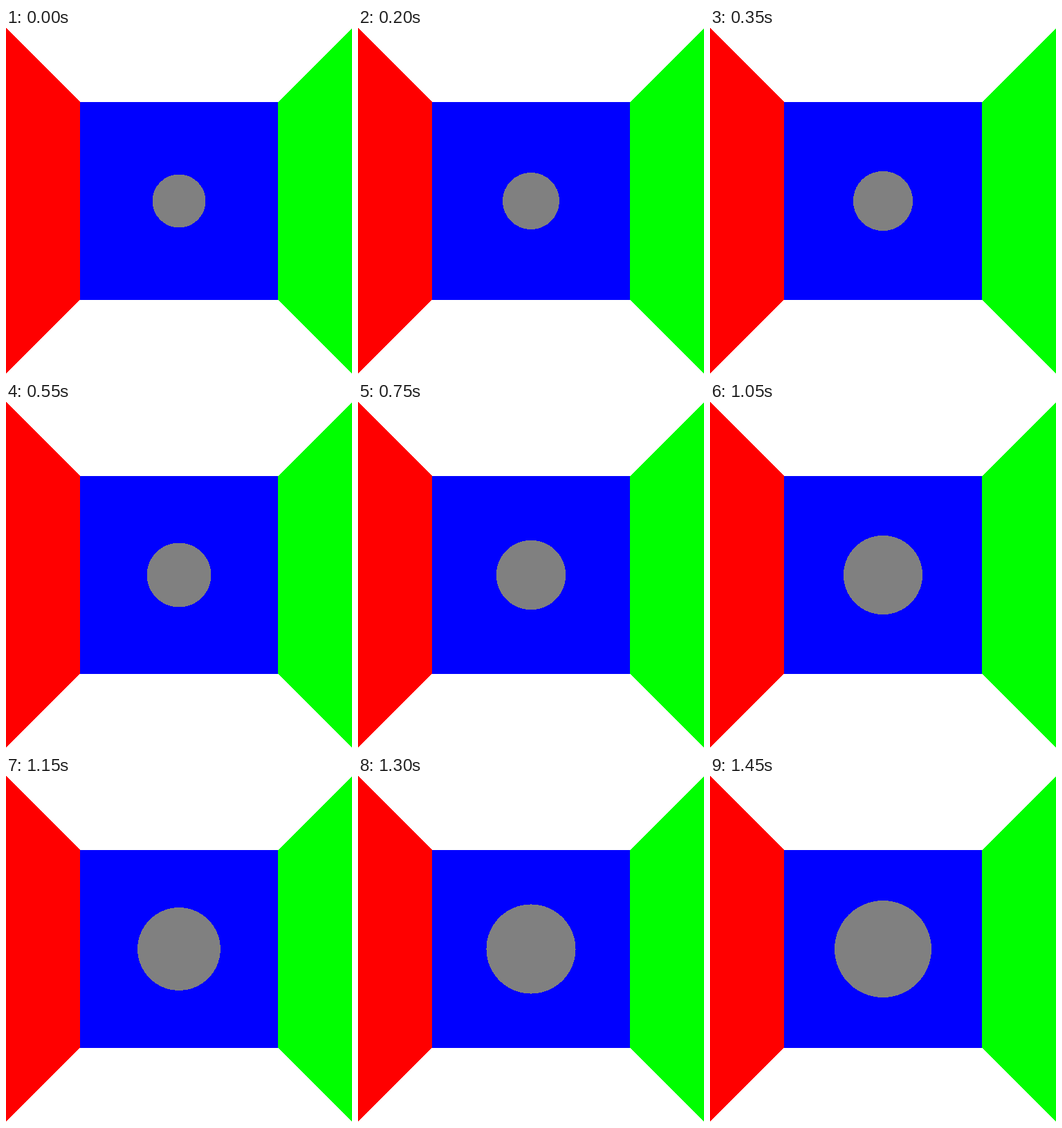
Write an HTML page that moves like this. It is 500 px wide and 500 px high and loops after 1.5 s.

```html
<!DOCTYPE html>
<html lang="en">
<head>
<meta charset="utf-8">
<title>Ball in a box</title>
<style>
  html, body { margin: 0; width: 100%; height: 100%; overflow: hidden; background: #fff; }
  svg { display: block; width: 100vw; height: 100vh; }
</style>
</head>
<body>
<svg viewBox="0 0 500 500" shape-rendering="crispEdges">
  <path fill="#f00" d="M0 0L107 107V393L0 499.5Z"/>
  <path fill="#0f0" d="M500 0L393 107V393L500 499.5Z"/>
  <path fill="#00f" d="M107 107H393V393H107Z"/>
  <circle id="ball" cx="250" cy="250" r="38.5" fill="#808080"/>
</svg>
<script>
  const LOOP = 1500, STEP = 50, LAST = LOOP / STEP - 1;
  const FAR_RADIUS = 38.5, TRAVEL = 0.45;
  const ball = document.getElementById('ball');
  const start = performance.now();

  // The ball nears the camera at constant speed; its size goes with 1 / depth.
  function draw(ms) {
    const step = Math.floor((ms % LOOP) / STEP);
    const depth = 1 - TRAVEL * step / LAST;
    ball.setAttribute('r', (FAR_RADIUS / depth).toFixed(2));
  }

  function tick() {
    draw(performance.now() - start);
    requestAnimationFrame(tick);
  }
  tick();
</script>
</body>
</html>
```
